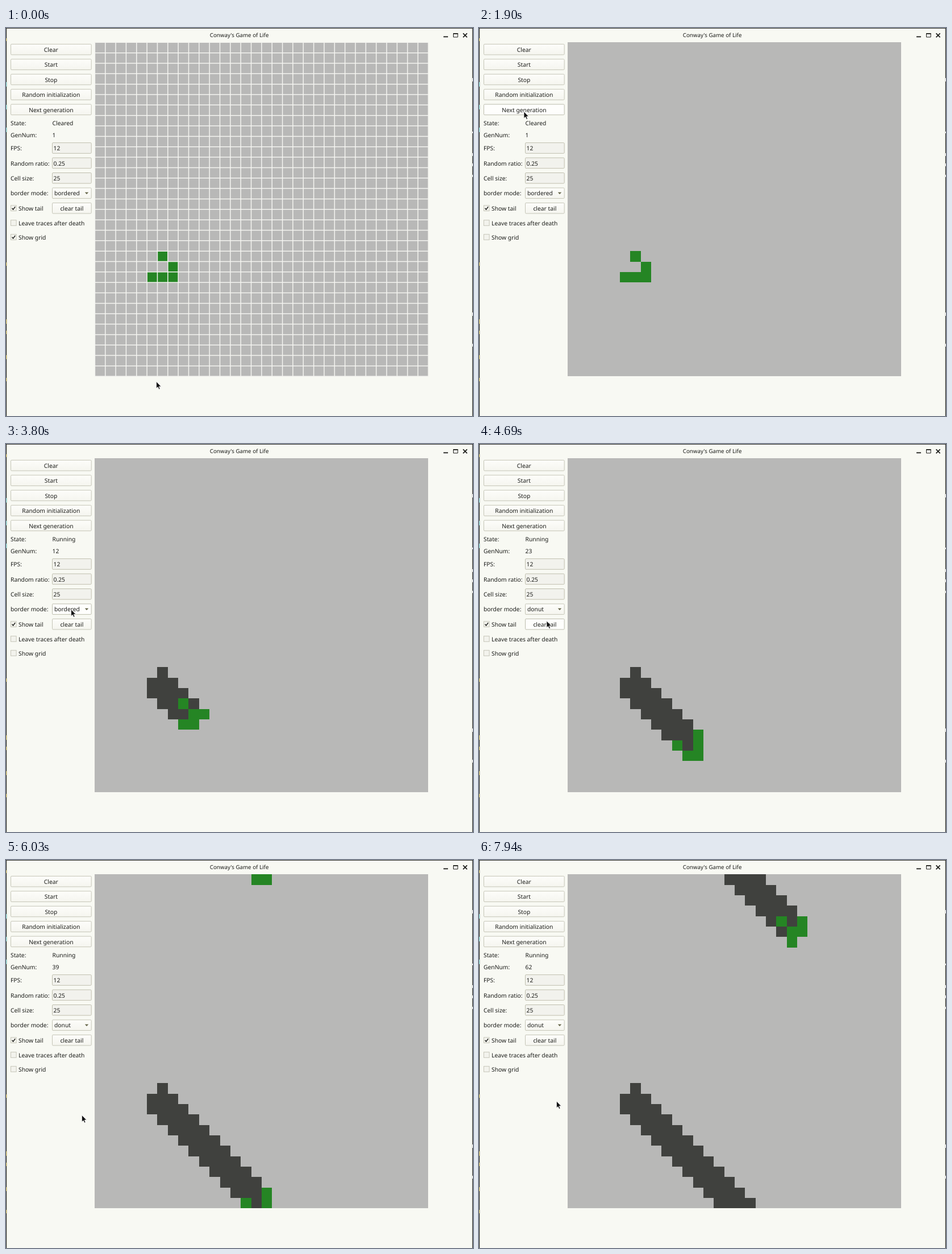
Recreate the animation shown at these times as an HTML page. Size 822x682 px, loop 8 s.

```html
<!DOCTYPE html>
<html lang="en">
<head>
<meta charset="utf-8">
<title>Conway's Game of Life</title>
<style>
  html, body { margin: 0; width: 100%; height: 100%; overflow: hidden; background: #f8f9f3; }
  svg { display: block; width: 822px; height: 682px; }
  text { font: 10.3px "Noto Sans", "Open Sans", sans-serif; fill: #1c1d1a; text-rendering: geometricPrecision; white-space: pre; }
  .title { font-size: 9.75px; }
  .mid { text-anchor: middle; }
  .button { fill: url(#face); stroke: #c5c5b7; }
  .button.hover { fill: #fefefc; stroke: #bdbdae; }
  .button.down { fill: #e9e9e2; }
  .field { fill: #f2f2ed; stroke: #bfbeae; }
  .box { fill: #f3f3ed; stroke: #c6c6b9; }
  .tick { fill: none; stroke: #1c1d1a; stroke-width: 1.5; }
  .cells { shape-rendering: crispEdges; }
</style>
</head>
<body>
<svg viewBox="0 0 822 682">
  <defs>
    <linearGradient id="face" x2="0" y2="1">
      <stop stop-color="#fdfdfa"/>
      <stop offset="1" stop-color="#f5f5ef"/>
    </linearGradient>
  </defs>
  <rect width="822" height="682" fill="#f8f9f3"/>

  <g id="frame">
    <path d="M0 .5H822" stroke="#33342f"/>
    <path d="M.6 0V682M821.4 0V682" stroke="#33342f" stroke-width="1.2"/>
    <path d="M.6 95v8M.6 135v8M.6 175v8" stroke="#7fd0d0" stroke-width="1.2"/>
    <path d="M.6 18v5M.6 412v6M.6 512v8M.6 532v6M.6 575v7M.6 615v6" stroke="#c9b45a" stroke-width="1.2"/>
    <path d="M821.4 88v6M821.4 182v3M821.4 220v5M821.4 238v5M821.4 258v4M821.4 500v6M821.4 555v5" stroke="#eee" stroke-width="1.2"/>
  </g>

  <text class="title mid" x="410.6" y="16.4">Conway's Game of Life</text>
  <g fill="none" stroke="#1c1d1a">
    <path d="M770 15.4h8" stroke-width="1.8"/>
    <path d="M787.5 9.8h7.6v6.2h-7.6z"/>
    <path d="M787 10h8.6" stroke-width="1.6"/>
    <path d="M804.6 9.4l7 7m0-7l-7 7" stroke-width="1.7"/>
  </g>

  <g id="panel"></g>

  <rect class="cells" x="156" y="25" width="587" height="587" fill="#b8b8b7"/>
  <path id="tail" class="cells" fill="#40413e"/>
  <path id="alive" class="cells" fill="#258524"/>
  <path id="grid" fill="none" stroke="#f4f4f0" stroke-width="1.5"/>

  <path id="cursor" d="M0 0V11.8L2.7 9.4L4.6 13.6L6.5 12.8L4.7 8.6H8.3Z" fill="#111" stroke="#fff" stroke-width=".7"/>
</svg>

<script>
const LOOP = 8000, GRID_OFF = 1600, PRESS = 2730, START = 2855, DONUT = 4450;
const STEP = 1000 / 12, SIZE = 32, CELL = 587 / SIZE, LEFT = 156.4, TOP = 25.3;
const $ = id => document.getElementById(id);

function add(tag, attrs, label = '') {
  const el = document.createElementNS('http://www.w3.org/2000/svg', tag);
  for (const key in attrs) el.setAttribute(key, attrs[key]);
  el.textContent = label;
  return $('panel').appendChild(el);
}

// Side panel
const buttons = [];
const write = (x, mid, label, cls = '') => add('text', { x, y: mid + 4.1, class: cls }, label);

function frame(x, mid, cls) {
  return add('rect', { x, y: mid - 9.3, width: 150.2 - x, height: 18.6, rx: 1.5, class: cls });
}
function button(x, mid, label) {
  const el = frame(x, mid, 'button');
  buttons.push({ el, x, mid });
  if (label) write((x + 150.2) / 2, mid, label, 'mid');
  return el;
}
function field(mid, label, value) {
  write(8, mid, label);
  frame(81.5, mid, 'field');
  write(83.5, mid, value);
}
function check(mid, label, on) {
  add('rect', { x: 8.5, y: mid - 4.8, width: 9.6, height: 9.6, class: 'box' });
  write(22, mid, label);
  return on && add('path', { d: `M10.6 ${mid}l2 2.4l3.6-5`, class: 'tick' });
}

button(8.5, 37.7, 'Clear');
const startButton = button(8.5, 64.1, 'Start');
button(8.5, 90.5, 'Stop');
button(8.5, 117, 'Random initialization');
button(8.5, 143.4, 'Next generation');
write(8, 167.2, 'State:');
const state = write(81.5, 167.2, 'Cleared');
write(8, 187.8, 'GenNum:');
const count = write(81.5, 187.8, '1');
field(211, 'FPS:', '12');
field(237.4, 'Random ratio:', '0.25');
field(263.8, 'Cell size:', '25');
write(8, 290.3, 'border mode:');
button(81.5, 290.3);
const mode = write(85, 290.3, 'bordered');
add('path', { d: 'M138.8 288.7h6.4l-3.2 3.6z', fill: '#66664a' });
check(316.7, 'Show tail', true);
button(81.5, 316.7, 'clear tail');
check(342.5, 'Leave traces after death', false);
const gridTick = check(367.5, 'Show grid', true);

// Board
let lines = '';
for (let i = 0; i <= SIZE; i++) {
  const d = i * CELL;
  lines += `M${LEFT + d} ${TOP}v587M${LEFT} ${TOP + d}h587`;
}
$('grid').setAttribute('d', lines);

const wrap = n => (n + SIZE) % SIZE;

function evolve(live) {
  const near = new Map();
  for (const id of live) {
    const x = id % SIZE, y = Math.floor(id / SIZE);
    for (let dx = -1; dx <= 1; dx++)
      for (let dy = -1; dy <= 1; dy++) {
        if (!dx && !dy) continue;
        const key = wrap(y + dy) * SIZE + wrap(x + dx);
        near.set(key, (near.get(key) || 0) + 1);
      }
  }
  return new Set([...near].filter(([id, n]) => n === 3 || (n === 2 && live.has(id))).map(e => e[0]));
}

function shape(ids) {
  let d = '';
  for (const id of ids) {
    const x = id % SIZE, y = Math.floor(id / SIZE);
    const at = (base, n) => Math.round(base + n * CELL);
    d += `M${at(LEFT, x)} ${at(TOP, y)}H${at(LEFT, x + 1)}V${at(TOP, y + 1)}H${at(LEFT, x)}Z`;
  }
  return d;
}

const glider = [[6, 20], [7, 21], [5, 22], [6, 22], [7, 22]];
const gens = [], seen = new Set();
let live = new Set(glider.map(([x, y]) => y * SIZE + x));
for (let i = 0; i < 62; i++) {
  gens.push({ alive: shape(live), tail: shape(seen) });
  live.forEach(id => seen.add(id));
  live = evolve(live);
}

// Pointer stops: time, x, y
const stops = [
  [0, 265, 622], [300, 168, 492], [610, 59, 361], [840, 28, 363], [1260, 13, 366],
  [1640, 13, 366], [1900, 79, 147], [2340, 84, 82], [2470, 91, 65], [2960, 91, 65],
  [3400, 112, 286], [3700, 114, 288], [4250, 117, 303], [4650, 119, 311], [5180, 119, 311],
  [5600, 129, 400], [5960, 133.5, 448.5], [6100, 133.5, 448.5], [6750, 135, 434],
  [7600, 136.5, 424], [LOOP, 136.5, 424]
];

function pointer(t) {
  const i = stops.findIndex(s => s[0] > t);
  const [t0, x0, y0] = stops[i - 1], [t1, x1, y1] = stops[i];
  const k = (t - t0) / (t1 - t0);
  return [x0 + (x1 - x0) * k, y0 + (y1 - y0) * k];
}

let shown = -1;
function draw() {
  const t = performance.now() % LOOP;
  const [x, y] = pointer(t);
  $('cursor').setAttribute('transform', `translate(${x} ${y})`);
  for (const b of buttons)
    b.el.classList.toggle('hover', x > b.x && x < 150 && Math.abs(y - b.mid) < 9.5);
  startButton.classList.toggle('down', t >= PRESS && t < START);

  const gridOn = t < GRID_OFF ? 'visible' : 'hidden';
  $('grid').setAttribute('visibility', gridOn);
  gridTick.setAttribute('visibility', gridOn);
  state.textContent = t < START ? 'Cleared' : 'Running';
  mode.textContent = t < DONUT ? 'bordered' : 'donut';

  const n = Math.min(gens.length - 1, Math.max(0, Math.floor((t - START) / STEP)));
  if (n !== shown) {
    shown = n;
    count.textContent = n + 1;
    $('alive').setAttribute('d', gens[n].alive);
    $('tail').setAttribute('d', gens[n].tail);
  }
  requestAnimationFrame(draw);
}
draw();
</script>
</body>
</html>
```
